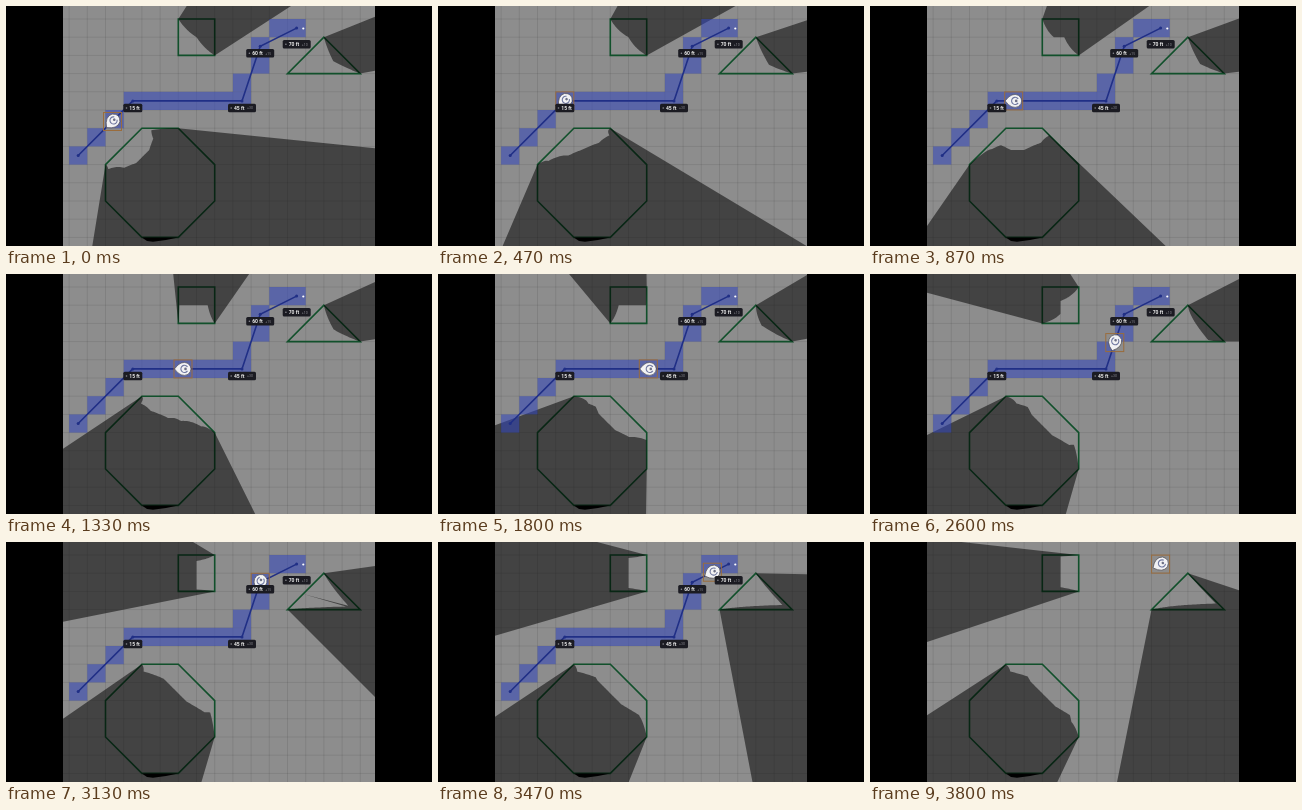
Recreate the animation shown at these times as an HTML page with a canvas. Size 426x240 px, loop 4.47 s.

```html
<!DOCTYPE html>
<html lang="en">
<head>
<meta charset="utf-8">
<title>Token walk with line of sight</title>
<style>
  html, body { margin: 0; width: 100%; height: 100%; overflow: hidden; background: #000; }
  canvas { display: block; width: 426px; height: 240px; }
</style>
</head>
<body>
<canvas id="stage" width="426" height="240"></canvas>
<script>
const ctx = document.getElementById('stage').getContext('2d');
const LOOP = 4470, STEP = 1000 / 15, ARRIVAL = 3730;
const CELL = 18.2, LEFT = 57, RIGHT = 369;
const gx = n => 63.1 + n * CELL;
const gy = n => 13 + n * CELL;
const corner = ([col, row]) => [gx(col), gy(row)];
const middle = ([col, row]) => [gx(col + 0.5), gy(row + 0.5)];

// depth: share of a shape's inside that sight passes through
const shapes = [
  { depth: 0.5, points: [[6, 0], [8, 0], [8, 2], [6, 2]].map(corner) },
  { depth: 0.8, points: [[14, 1], [16, 3], [12, 3]].map(corner) },
  { depth: 0.2, points: [[4, 6], [6, 6], [8, 8], [8, 10], [6, 12], [4, 12], [2, 10], [2, 8]].map(corner) }
];

const route = [[0, 7], [3, 4], [9, 4], [10, 1], [12, 0]].map(middle);
const [, bend, turn, rise, goal] = route;
const keys = [
  [0, [106.5, 115.5]], [410, bend], [630, bend], [2160, turn],
  [2200, turn], [3030, rise], [3140, rise], [ARRIVAL, goal]
];
// column, row, width, height
const cells = [[0, 7, 1, 1], [1, 6, 1, 1], [2, 5, 1, 1], [3, 4, 7, 1], [9, 3, 1, 1], [10, 1, 1, 2], [11, 0, 2, 1]];
const labels = [
  [126.8, 102, 19, '15 ft', ''], [236, 102, 28, '45 ft', '+30'],
  [254.2, 47.3, 28, '60 ft', '+15'], [290.7, 38.2, 28, '70 ft', '+10']
];

function pose(time) {
  let heading = -Math.PI / 4;
  for (let i = 1; i < keys.length; i++) {
    const [t0, a] = keys[i - 1], [t1, b] = keys[i];
    if (a !== b) heading = Math.atan2(b[1] - a[1], b[0] - a[0]);
    if (time < t1) {
      const p = (time - t0) / (t1 - t0);
      return { x: a[0] + (b[0] - a[0]) * p, y: a[1] + (b[1] - a[1]) * p, heading };
    }
  }
  return { x: goal[0], y: goal[1], heading };
}

function trace(points, close) {
  points.forEach(([x, y], i) => i ? ctx.lineTo(x, y) : ctx.moveTo(x, y));
  if (close) ctx.closePath();
}

// Distances at which a ray enters and leaves a polygon
function chord(points, eye, angle) {
  const dx = Math.cos(angle), dy = Math.sin(angle);
  let near = Infinity, far = 0;
  points.forEach(([x, y], i) => {
    const [x2, y2] = points[(i + 1) % points.length];
    const ex = x2 - x, ey = y2 - y, det = dx * ey - dy * ex;
    if (Math.abs(det) < 1e-9) return;
    const px = x - eye.x, py = y - eye.y;
    const along = (px * dy - py * dx) / det;
    if (along < 0 || along > 1) return;
    const distance = (px * ey - py * ex) / det;
    near = Math.min(near, distance);
    far = Math.max(far, distance);
  });
  return [near, far];
}

function traceShadow({ points, depth }, eye) {
  const mean = k => points.reduce((sum, p) => sum + p[k], 0) / points.length;
  const base = Math.atan2(mean(1) - eye.y, mean(0) - eye.x);
  const offsets = points.map(([x, y]) => {
    const a = Math.atan2(y - eye.y, x - eye.x) - base;
    return Math.atan2(Math.sin(a), Math.cos(a));
  });
  const lo = Math.min(...offsets) + 1e-4, hi = Math.max(...offsets) - 1e-4;
  const angles = offsets.map(a => Math.max(lo, Math.min(hi, a)));
  for (let i = 1; i < 60; i++) angles.push(lo + (hi - lo) * i / 60);
  angles.sort((a, b) => a - b);

  const at = (a, r) => [eye.x + r * Math.cos(base + a), eye.y + r * Math.sin(base + a)];
  const front = angles.map(a => {
    const [near, far] = chord(points, eye, base + a);
    return at(a, near + (far - near) * depth);
  });
  const back = angles.map(a => at(a, 1500)).reverse();
  trace(front.concat(back), true);
}

function drawFloor() {
  ctx.fillStyle = '#8d8d8d';
  ctx.fillRect(LEFT, 0, RIGHT - LEFT, 240);
  ctx.strokeStyle = 'rgba(0,0,0,.09)';
  ctx.lineWidth = 1;
  ctx.beginPath();
  for (let n = 0; n < 17; n++) trace([[gx(n), 0], [gx(n), 240]]);
  for (let n = 0; n < 13; n++) trace([[LEFT, gy(n)], [RIGHT, gy(n)]]);
  ctx.stroke();

  ctx.strokeStyle = '#11502b';
  ctx.lineWidth = 1.6;
  ctx.beginPath();
  shapes.forEach(s => trace(s.points, true));
  ctx.stroke();
}

function drawDarkness(eye) {
  ctx.fillStyle = 'rgba(0,0,0,.52)';
  ctx.beginPath();
  shapes.forEach(s => traceShadow(s, eye));
  ctx.fill();
  ctx.fillStyle = '#000';
  ctx.beginPath();
  trace([corner([4, 12]), corner([6, 12]), [160, 234], [147, 235.8], [141, 235]], true);
  ctx.fill();
}

function drawRuler() {
  ctx.fillStyle = 'rgba(50,70,190,.55)';
  cells.forEach(([col, row, w, h]) => ctx.fillRect(gx(col), gy(row), w * CELL, h * CELL));
  ctx.strokeStyle = ctx.fillStyle = '#202f86';
  ctx.lineWidth = 1.6;
  ctx.beginPath();
  trace(route);
  ctx.stroke();
  route.forEach(([x, y]) => disc(x, y, 1.5));
}

function disc(x, y, r) {
  ctx.beginPath();
  ctx.arc(x, y, r, 0, 7);
  ctx.fill();
}

function drawToken({ x, y, heading }) {
  ctx.save();
  ctx.translate(x, y);
  ctx.strokeStyle = '#9a6c3c';
  ctx.lineWidth = 1;
  ctx.strokeRect(-9, -9, 18, 18);
  ctx.rotate(heading);
  ctx.fillStyle = '#f2f2f4';
  ctx.strokeStyle = '#55535a';
  ctx.lineWidth = 0.7;
  ctx.beginPath();
  ctx.moveTo(-8.5, 0);
  ctx.quadraticCurveTo(-2, -9, 5, -5.5);
  ctx.quadraticCurveTo(11, 0, 5, 5.5);
  ctx.quadraticCurveTo(-2, 9, -8.5, 0);
  ctx.fill();
  ctx.stroke();
  ctx.strokeStyle = '#7078a0';
  ctx.lineWidth = 1.1;
  ctx.beginPath();
  ctx.arc(1.5, 0, 3.6, 0.6, 5.7);
  ctx.stroke();
  ctx.fillStyle = '#6d7086';
  disc(2.5, 0, 1.3);
  ctx.restore();
}

function drawLabels() {
  ctx.textBaseline = 'middle';
  labels.forEach(([x, y, width, total, leg]) => {
    const left = x - width / 2;
    ctx.fillStyle = '#1b1b22';
    ctx.beginPath();
    ctx.roundRect(left, y - 4.2, width, 8.4, 1.5);
    ctx.fill();
    ctx.fillStyle = '#8b8b92';
    disc(left + 3.2, y, 0.8);
    ctx.fillStyle = '#eee';
    ctx.font = 'bold 5px Roboto, sans-serif';
    ctx.fillText(total, left + 6, y + 0.3);
    ctx.fillStyle = '#85858c';
    ctx.font = '3.5px Roboto, sans-serif';
    ctx.fillText(leg, left + 19, y + 0.4);
  });
  ctx.fillStyle = '#fff';
  disc(297.3, 22.5, 1.1);
}

function draw(now) {
  const time = Math.floor((now % LOOP + 4) / STEP) * STEP;
  const token = pose(time);
  const moving = time < ARRIVAL;
  ctx.clearRect(0, 0, 426, 240);
  ctx.save();
  ctx.beginPath();
  ctx.rect(LEFT, 0, RIGHT - LEFT, 240);
  ctx.clip();
  drawFloor();
  drawDarkness(token);
  if (moving) drawRuler();
  drawToken(token);
  if (moving) drawLabels();
  ctx.restore();
}

const start = performance.now();
function tick() {
  draw(performance.now() - start);
  requestAnimationFrame(tick);
}
tick();
</script>
</body>
</html>
```
